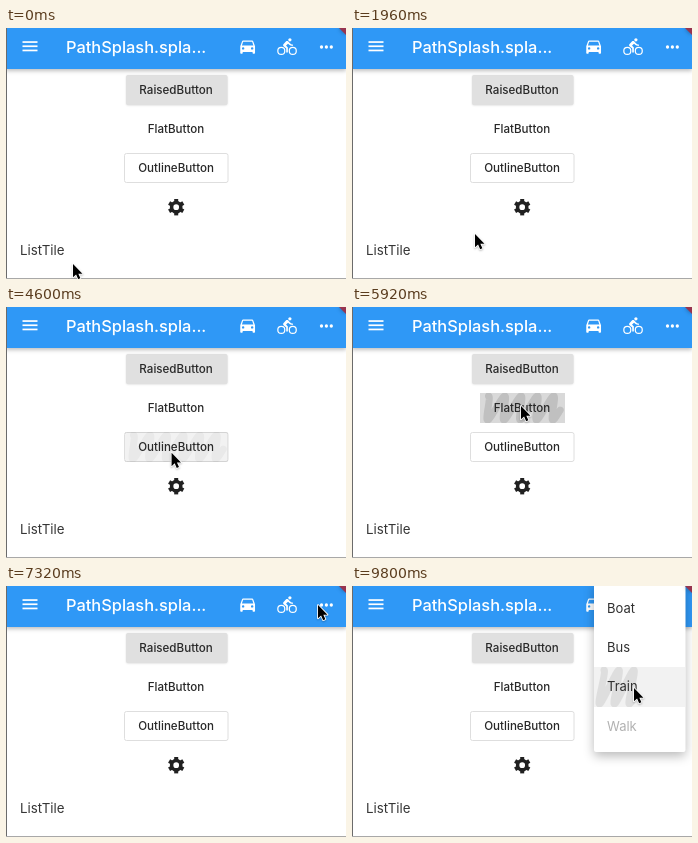
Write an HTML page with a canvas that moves like this. It is 340 by 251 pixels and loops after 9.84 s.

```html
<!DOCTYPE html>
<html lang="en">
<head>
<meta charset="utf-8">
<title>PathSplash</title>
<style>
  html, body { margin: 0; width: 100%; height: 100%; overflow: hidden; background: #fff; }
  canvas { display: block; }
</style>
</head>
<body>
<canvas id="stage" width="340" height="251"></canvas>
<script>
const ctx = document.getElementById('stage').getContext('2d');
const LOOP = 9840, FADE = 240;
const FONT = 'Inter, Roboto, sans-serif';

// Pointer rests and moves: time, x, y
const pointer = [
  [0, 67, 236], [320, 67, 236], [480, 73, 218], [1760, 73, 218],
  [1960, 123, 206], [2520, 173, 182], [3120, 173, 182], [3360, 165.5, 147],
  [4560, 165.5, 147], [5000, 169, 99], [6000, 169, 99], [6880, 291, 22],
  [6920, 291, 22], [7040, 300, 22], [7200, 300, 22], [7320, 312, 19],
  [7840, 312, 19], [8120, 305, 47], [8560, 282, 102], [LOOP, 282, 102]
];

// Ink areas; reach is the width covered by the scribble
const taps = {
  tile:    { down: 880,  up: 1680, x: 1,   y: 200, w: 338, h: 45, reach: 251, fill: .03, ink: .14 },
  gear:    { down: 2760, up: 3080, x: 143, y: 153, w: 55,  h: 54, reach: 55,  fill: 0,   ink: .15 },
  outline: { down: 3720, up: 4440, x: 119, y: 125, w: 103, h: 30, reach: 103, fill: .15, ink: .12 },
  flat:    { down: 5200, up: 5920, x: 128, y: 86,  w: 85,  h: 30, reach: 85,  fill: .15, ink: .12 },
  more:    { down: 7640, up: 7800, x: 293, y: -8,  w: 55,  h: 54, reach: 55,  fill: 0,   ink: .15 },
  train:   { down: 8840, up: 9680, x: 242, y: 81,  w: 91,  h: 40, reach: 47,  fill: .105, ink: .165 }
};

const car = new Path2D('M18.9 6C18.7 5.4 18.2 5 17.5 5h-11C5.8 5 5.3 5.4 5.1 6L3 12v8q0 1 1 1h1q1 0 1-1v-1h12v1q0 1 1 1h1q1 0 1-1v-8z' +
  'M8 14.5a1.5 1.5 0 1 0-3 0a1.5 1.5 0 1 0 3 0zM19 14.5a1.5 1.5 0 1 0-3 0a1.5 1.5 0 1 0 3 0zM5 11l1.5-4.5h11L19 11z');
const rider = new Path2D('M10.8 10.5l2.4-2.4.8.8c1.3 1.3 3 2.1 5.1 2.1V9c-1.5 0-2.7-.6-3.6-1.5l-1.9-1.9' +
  'c-.9-.8-2.2-.8-3 0L7.8 8.4c-.8.8-.8 2.1 0 2.8L11 14v5h2v-6.2z');
const arrow = new Path2D('M0 0V15.5L3.6 12.1L6 17.6L8.6 16.5L6.2 11.2H11z');

const clamp = v => Math.min(1, Math.max(0, v));
const span = (t, a, b) => clamp((t - a) / (b - a));
const smooth = v => v * v * (3 - 2 * v);

function box(x, y, w, h, r, fill) {
  ctx.beginPath();
  ctx.roundRect(x, y, w, h, r);
  ctx.fillStyle = fill;
  ctx.fill();
}

function dot(x, y, r) {
  ctx.beginPath();
  ctx.arc(x, y, r, 0, 7);
  ctx.fill();
}

function ring(x, y, r, width) {
  ctx.beginPath();
  ctx.arc(x, y, r, 0, 7);
  ctx.lineWidth = width;
  ctx.stroke();
}

function label(text, x, y, size, weight, color, align = 'left') {
  ctx.font = `${weight} ${size}px ${FONT}`;
  ctx.textAlign = align;
  ctx.textBaseline = 'alphabetic';
  ctx.fillStyle = color;
  ctx.fillText(text, x, y);
}

function shadow(color, blur, dy) {
  ctx.shadowColor = color;
  ctx.shadowBlur = blur;
  ctx.shadowOffsetY = dy;
}

function at(x, y, scale, draw) {
  ctx.save();
  ctx.translate(x, y);
  ctx.scale(scale, scale);
  draw();
  ctx.restore();
}

function splash(t, { down, up, x, y, w, h, reach, fill, ink }) {
  if (t < down || t > up + FADE) return;
  const fade = 1 - span(t, up, up + FADE);
  const drawn = span(t, down, down + 160);
  const turns = reach / 18, steps = 400;
  ctx.save();
  ctx.beginPath();
  ctx.rect(x, y, w, h);
  ctx.clip();
  ctx.fillStyle = `rgba(0,0,0,${fill * fade * span(t, down, down + 100)})`;
  ctx.fillRect(x, y, w, h);
  ctx.beginPath();
  for (let i = 0; i <= steps * drawn; i++) {
    const u = i / steps, swing = Math.cos(u * turns * 2 * Math.PI);
    ctx.lineTo(x + 4 + u * (reach - 8) + swing * h * .15, y + h / 2 - swing * (h / 2 - 3));
  }
  ctx.lineWidth = 7;
  ctx.lineCap = ctx.lineJoin = 'round';
  ctx.strokeStyle = `rgba(0,0,0,${ink * fade})`;
  ctx.stroke();
  ctx.restore();
}

function gear() {
  ctx.fillStyle = ctx.strokeStyle = '#212121';
  ring(0, 0, 4.6, 3.5);
  for (let i = 0; i < 6; i++) {
    ctx.rotate(Math.PI / 3);
    ctx.fillRect(-2, -8.2, 4, 3);
  }
}

function bike() {
  ctx.fill(rider);
  dot(15.5, 3.5, 2);
  ring(5, 17, 4.25, 1.5);
  ring(19, 17, 4.25, 1.5);
}

function appBar(t) {
  ctx.save();
  shadow('rgba(0,0,0,.25)', 4, 1.5);
  ctx.fillStyle = '#2f98f6';
  ctx.fillRect(0, -10, 340, 51);
  ctx.restore();
  ctx.fillStyle = ctx.strokeStyle = '#fff';
  for (let i = 0; i < 3; i++) ctx.fillRect(16.5, 13.2 + i * 4.2, 15, 1.7);
  label('PathSplash.spla...', 60, 24.7, 16.4, 500, '#fff');
  at(231.8, 8.5, .82, () => ctx.fill(car, 'evenodd'));
  at(271.2, 9, .82, bike);
  for (let i = 0; i < 3; i++) dot(315.5 + i * 4.9, 19, 1.65);
  splash(t, taps.more);
}

function page(t) {
  ctx.save();
  shadow('rgba(0,0,0,.14)', 2, .5);
  box(120, 47, 101.5, 30, 2, '#e0e0e0');
  ctx.restore();
  ctx.strokeStyle = '#dedede';
  ctx.lineWidth = 1;
  ctx.beginPath();
  ctx.roundRect(118.5, 125.5, 103.5, 29, 2);
  ctx.stroke();
  ['flat', 'outline', 'gear', 'tile'].forEach(name => splash(t, taps[name]));
  label('RaisedButton', 170.1, 65.6, 11.6, 500, '#282828', 'center');
  label('FlatButton', 170, 104.6, 11.6, 500, '#282828', 'center');
  label('OutlineButton', 170.1, 143.9, 11.6, 500, '#282828', 'center');
  at(170.2, 179.2, 1, gear);
  label('ListTile', 14, 226.8, 13.3, 400, '#363636');
}

function menu(t) {
  const p = t < 9680 ? span(t, 7760, 8060) : 1 - span(t, 9750, 10050);
  if (!p) return;
  const unit = 1 / 5.5;
  const w = 91.5 * clamp(p / unit), h = 170 * clamp(p / unit / 4);
  ctx.save();
  ctx.globalAlpha = clamp(p * 3);
  ctx.save();
  shadow('rgba(0,0,0,.28)', 11, 4);
  box(333.5 - w, -4, w, h, 2, '#fff');
  ctx.restore();
  ctx.beginPath();
  ctx.rect(333.5 - w, -4, w, h);
  ctx.clip();
  splash(t, taps.train);
  ['Boat', 'Bus', 'Train', 'Walk'].forEach((name, i) => {
    const start = (i + 1) * unit;
    ctx.globalAlpha = span(p, start, Math.min(1, start + 1.5 * unit));
    label(name, 255, 26.7 + i * 39.3, 13, 400, '#303030');
  });
  ctx.restore();
}

function banner() {
  ctx.save();
  shadow('rgba(0,0,0,.4)', 4, 0);
  ctx.fillStyle = '#97344f';
  ctx.beginPath();
  ctx.moveTo(333, 0);
  ctx.lineTo(340, 0);
  ctx.lineTo(340, 7);
  ctx.fill();
  ctx.restore();
}

function cursor(t) {
  const i = pointer.findIndex(key => key[0] > t);
  const [t0, x0, y0] = pointer[i - 1], [t1, x1, y1] = pointer[i];
  const k = smooth(span(t, t0, t1));
  at(x0 + (x1 - x0) * k, y0 + (y1 - y0) * k, .86, () => {
    shadow('rgba(0,0,0,.25)', 2, 1);
    ctx.lineWidth = 2;
    ctx.lineJoin = 'round';
    ctx.strokeStyle = '#fff';
    ctx.stroke(arrow);
    shadow('transparent', 0, 0);
    ctx.fillStyle = '#000';
    ctx.fill(arrow);
  });
}

function frame() {
  const t = performance.now() % LOOP;
  ctx.fillStyle = '#fff';
  ctx.fillRect(0, 0, 340, 251);
  page(t);
  appBar(t);
  menu(t);
  banner();
  ctx.fillStyle = '#6b6b6b';
  ctx.fillRect(0, 0, 1, 251);
  ctx.fillStyle = '#a8a8a8';
  ctx.fillRect(0, 250, 340, 1);
  cursor(t);
  requestAnimationFrame(frame);
}
frame();
</script>
</body>
</html>
```
